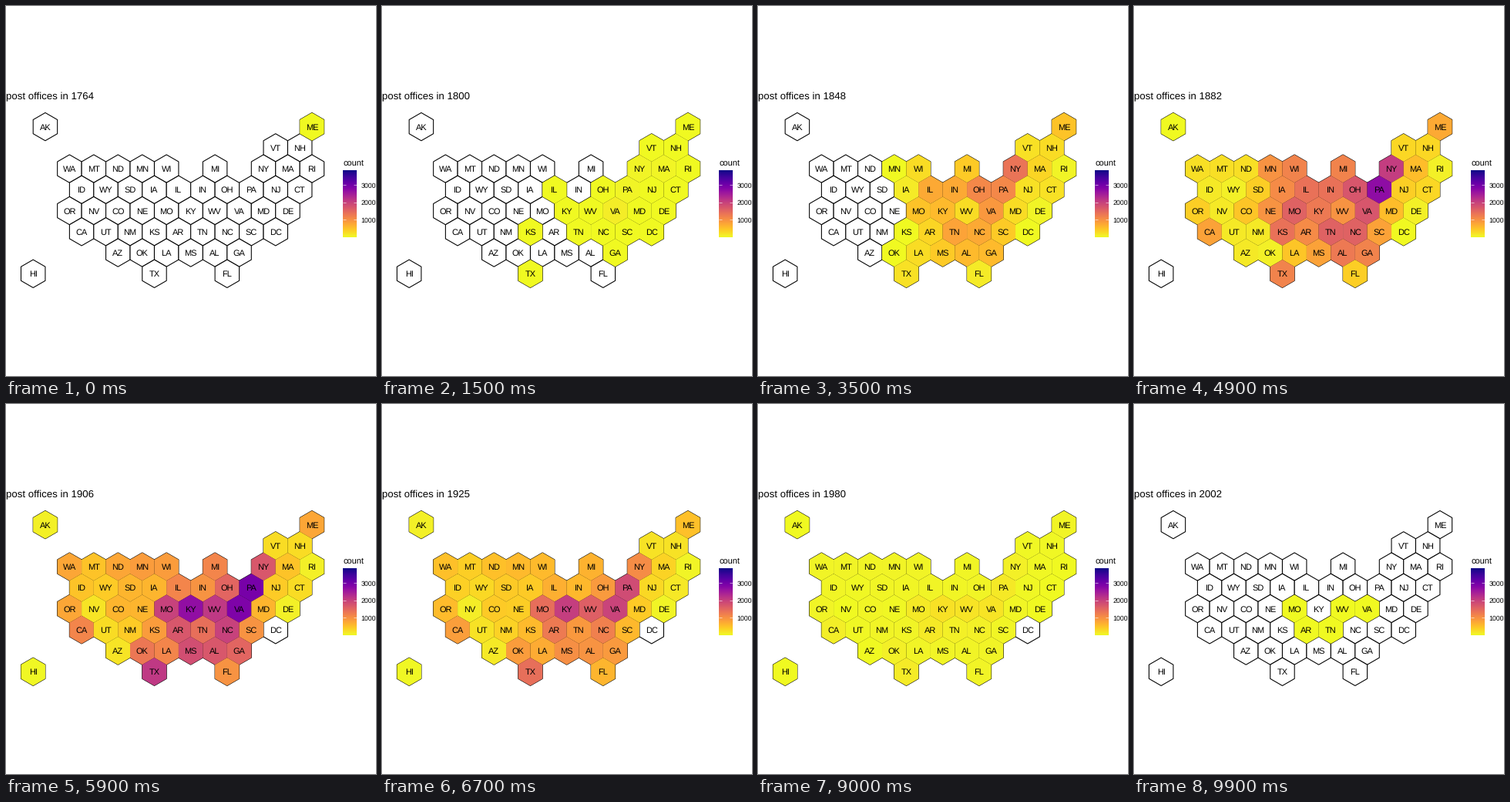
Write a matplotlib script that moves like this. It is 480 px wide and 480 px high and loops after 10000 ms.

```python
import numpy as np
import matplotlib.pyplot as plt
from matplotlib.animation import FuncAnimation
from matplotlib.patches import Polygon

SIZE, DPI = 480, 96
PT = 72 / DPI
FRAMES, INTERVAL = 100, 100
FIRST, LAST = 1764, 2002
MAX_COUNT = 3850
RADIUS = 18.16
HALF = RADIUS * np.sqrt(3) / 2

plt.rcParams.update({"font.family": "Liberation Sans", "text.hinting": "none"})

# row, first half-column, states two half-columns apart ("." is a gap)
GRID = [
    (0, 1, "AK"), (0, 23, "ME"),
    (1, 20, "VT NH"),
    (2, 3, "WA MT ND MN WI . MI . NY MA RI"),
    (3, 4, "ID WY SD IA IL IN OH PA NJ CT"),
    (4, 3, "OR NV CO NE MO KY WV VA MD DE"),
    (5, 4, "CA UT NM KS AR TN NC SC DC"),
    (6, 7, "AZ OK LA MS AL GA"),
    (7, 0, "HI"), (7, 10, "TX"), (7, 16, "FL"),
]

# year of the first post office
STARTS = {
    1764: "ME", 1768: "NH", 1772: "MA", 1775: "NY PA VA", 1778: "CT MD",
    1782: "RI NJ", 1786: "NC SC", 1789: "DE GA", 1792: "VT KY WV",
    1794: "TN TX", 1796: "DC OH", 1798: "IL KS", 1801: "IN MS MI",
    1804: "LA MO AL", 1817: "AR", 1821: "FL WI", 1824: "OK", 1828: "MN",
    1833: "IA", 1849: "CA UT NM OR", 1851: "WA ND NE WY", 1853: "NV",
    1857: "AZ", 1859: "CO SD", 1861: "ID", 1863: "MT", 1867: "AK", 1900: "HI",
}

# post offices per state, grouped by count
COUNTS = {
    1800: {120: "VA", 50: "PA NY", 40: "MA",
           10: "ME VT NH RI NJ CT MD DE NC SC GA KY WV TN OH DC IL KS TX"},
    1848: {1350: "NY", 1100: "OH PA", 920: "VA", 800: "TN", 740: "IL IN NC",
           580: "KY GA AL", 490: "MO ME", 430: "SC MS MI", 330: "AR MA",
           260: "LA WV WI MD NH", 220: "VT NJ CT TX", 130: "IA FL",
           60: "DE RI", 12: "MN OK KS DC"},
    1882: {2720: "PA", 2050: "NY", 1720: "VA OH", 1570: "MO TN NC",
           1370: "KS IL IN", 1280: "KY AL", 1160: "GA WI TX MI", 1080: "IA AR",
           980: "WV MN NE", 820: "SC CA MS", 750: "ME", 550: "MA MD",
           480: "LA CO", 390: "SD FL OR NJ", 310: "VT NH CT", 240: "WA ND MT",
           140: "UT NM ID NV AZ", 80: "WY OK RI DE", 12: "AK DC"},
    1906: {2950: "PA", 2880: "VA", 2680: "KY", 2120: "WV TX", 2000: "MO NC",
           1830: "MS", 1700: "AR AL NY", 1530: "OH GA", 1400: "TN",
           1300: "OK", 1140: "CA LA IL MI", 980: "SC FL IN",
           880: "KS MN WI", 770: "ND WA OR ME", 630: "IA SD NE CO MD",
           490: "ID MT MA", 410: "NM NJ WY", 270: "UT NH VT CT",
           190: "NV AZ", 80: "RI DE AK", 30: "HI"},
    1949: {1350: "KY", 1050: "WV VA", 830: "MO PA AR", 720: "TX", 580: "CA",
           470: "TN OK NC NY", 350: "AL MS GA OH OR LA",
           280: "WA MT ND MN WI ME KS NM FL IL",
           235: "MI CO SD IA IN MD SC ID", 180: "NE WY NJ MA",
           130: "UT NH VT", 90: "AZ AK", 50: "NV CT", 20: "RI DE HI"},
}
SURVIVORS = "MO WV VA AR TN".split()


def by_state(groups):
    return {s: n for n, names in groups.items() for s in names.split()}


START = by_state(STARTS)
COUNT = {year: by_state(groups) for year, groups in COUNTS.items()}


def last_year(state):
    if state == "DC":
        return 1903
    if state in SURVIVORS:
        return LAST + 1
    return 1985 + 15 * min(1, COUNT[1949][state] / 400) ** 0.5


def history(state):
    """Start, end and a count curve, eased through its square root."""
    start, end = START[state], last_year(state)
    points = {year: c.get(state, 1) for year, c in COUNT.items()}
    points[1898] = max(points[1882], points[1906]) * (1.3 if state == "PA" else 1.2)
    points[1975] = points[1949] / 4
    points = {y: n for y, n in points.items() if y > start}
    points.update({start: 1, max(end, 1976): 2})
    years = sorted(points)
    return start, end, years, [points[y] ** 0.5 for y in years]


def text(x, y, label, px, **kw):
    return ax.text(x, y, label, fontsize=px * PT, va="baseline", zorder=4, **kw)


fig = plt.figure(figsize=(SIZE / DPI, SIZE / DPI), dpi=DPI, facecolor="white")
ax = fig.add_axes([0, 0, 1, 1])
ax.axis("off")
cmap = plt.get_cmap("plasma_r")

# legend
top, bottom, left, right = 213.3, 299.7, 437.2, 454.5
ax.imshow(np.linspace(1, 0, 256)[:, None], cmap=cmap, aspect="auto",
          extent=(left, right, bottom, top), interpolation="bilinear")
text(left, 207, "count", 11)
for n in (1000, 2000, 3000):
    y = bottom - (bottom - top) * n / MAX_COUNT
    for x0, x1 in ((left, left + 3.46), (right - 3.46, right)):
        ax.plot([x0, x1], [y, y], color="white", lw=0.55 * PT,
                solid_capstyle="butt", zorder=3)
    text(460.3, y + 3.3, str(n), 8.8)

ax.set_xlim(0, SIZE)
ax.set_ylim(SIZE, 0)

# map
angles = np.radians(np.arange(30, 390, 60))
hexagon = RADIUS * np.column_stack([np.cos(angles), np.sin(angles)])
tiles = []
for row, col, names in GRID:
    for i, state in enumerate(names.split()):
        if state == ".":
            continue
        x, y = 35.2 + HALF * (col + 2 * i), 156.6 + 1.5 * RADIUS * row
        shape = hexagon + (x, y)
        ax.add_patch(Polygon(shape, fc="white", ec="black", lw=1.07 * PT, zorder=1))
        fill = ax.add_patch(Polygon(shape, lw=0, ec="none", zorder=2))
        text(x, y + 4, state, 11.04, ha="center")
        tiles.append((fill, history(state)))

title = text(0, 121, "", 13.2)


def draw(i):
    year = round(FIRST + (LAST - FIRST) * i / (FRAMES - 1))
    title.set_text(f"post offices in {year}")
    for fill, (start, end, years, roots) in tiles:
        fill.set_visible(start <= year < end)
        fill.set_facecolor(cmap(np.interp(year, years, roots) ** 2 / MAX_COUNT))
    return [title]


anim = FuncAnimation(fig, draw, frames=FRAMES, interval=INTERVAL,
                     repeat=True, repeat_delay=0, blit=False)
plt.show()
```
